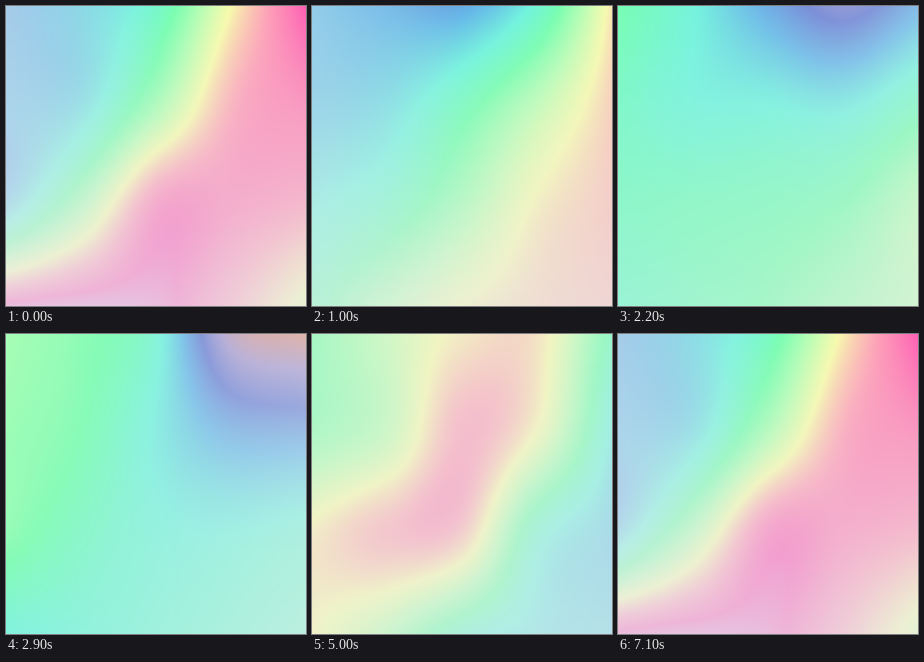
Recreate the animation shown at these times as an HTML page with a canvas. Size 300 by 300 pixels, loop 7.2 s.

```html
<!DOCTYPE html>
<html lang="en">
<head>
<meta charset="utf-8">
<title>Holographic gradient</title>
<style>
  html, body { margin: 0; width: 100%; height: 100%; overflow: hidden; }
  canvas { display: block; width: 100vw; height: 100vh; }
</style>
</head>
<body>
<canvas id="stage" width="300" height="300"></canvas>
<script>
const SIZE = 300, LOOP = 7200, STEP = 100;
const COLS = 5, ROWS = 4;

// Colour ramp: entry i belongs to tone i - 1.
const RAMP = ['#c8a4e4', '#ff50b0', '#ff9cb4', '#f8fba8', '#b4ffb0', '#70ffac',
  '#6cf4dc', '#64b8e8', '#6a80d4', '#a89cd0', '#dc9c90'].map(rgb);
const PALE = rgb('#e6e9ec');

// tone: coarse control grid; pale: top left, middle, right, bottom left, right.
const KEYS = [
  { at: 0,
    tone: [6.2, 5.6, 4.6, 2, .1,   6, 5.4, 3.3, 1.1, .6,
           5.7, 3.2, .5, .6, .9,   -.2, -.5, -.3, .9, 2.2],
    pale: [.5, .08, .05, .68, .65] },
  { at: 1000,
    tone: [5.9, 6.1, 6.2, 4.8, 1.8,   5.8, 5.4, 4.3, 2.9, 1.45,
           5.1, 4.5, 3.3, 1.9, 1.3,   4.3, 3, 2, 1.5, 1.3],
    pale: [.35, 0, .1, .62, .6] },
  { at: 1600,
    tone: [5.1, 5.8, 6.9, 6, 3.1,   5.3, 5.4, 4.8, 3.8, 2.4,
           4.9, 4.2, 3.5, 2.9, 1.75,   4.3, 3.5, 2.9, 2.2, 1.7],
    pale: [.05, 0, .2, .55, .5] },
  { at: 2900,
    tone: [3.3, 3.8, 4.8, 8.3, 9,   3.5, 4, 5.1, 6.2, 6.4,
           3.7, 4.4, 4.9, 5, 4.8,   5, 4.9, 4.8, 4.7, 4.6],
    pale: [.1, .2, .3, .18, .65] },
  { at: 3900,
    tone: [3.6, 2.6, 2.3, 4.2, 8.5,   2.8, 3, 3.9, 5.4, 7.3,
           3.1, 3.9, 4.8, 5.7, 6.3,   4.4, 4.8, 5, 5.3, 5.7],
    pale: [.2, .2, .4, .15, .55] },
  { at: 5800,
    tone: [3.9, 3.1, 1.7, .9, 1.3,   4.5, 2.8, -.3, .4, 2.9,
           1.3, -.3, -.8, 3.3, 4.8,   .4, 1.3, 4, 5.3, 5.4],
    pale: [.45, .5, .3, .68, .66] }
];

function rgb(hex) {
  return [1, 3, 5].map(i => parseInt(hex.slice(i, i + 2), 16));
}

const mix = (a, b, k) => a + (b - a) * k;

// Catmull-Rom weights of n control points for every pixel along one side.
function splineWeights(n) {
  return Array.from({ length: SIZE }, (_, px) => {
    const pos = px / (SIZE - 1) * (n - 1);
    const i = Math.min(Math.floor(pos), n - 2), f = pos - i;
    const w = new Array(n).fill(0);
    const add = (j, v) => {
      if (j < 0) { w[0] += 2 * v; w[1] -= v; }
      else if (j >= n) { w[n - 1] += 2 * v; w[n - 2] -= v; }
      else w[j] += v;
    };
    add(i - 1, (-f + 2 * f * f - f ** 3) / 2);
    add(i, (2 - 5 * f * f + 3 * f ** 3) / 2);
    add(i + 1, (f + 4 * f * f - 3 * f ** 3) / 2);
    add(i + 2, (f ** 3 - f * f) / 2);
    return w;
  });
}

const wx = splineWeights(COLS), wy = splineWeights(ROWS);
const ctx = document.getElementById('stage').getContext('2d');
const image = ctx.createImageData(SIZE, SIZE);
image.data.fill(255);

// Key with any index; its time keeps growing past the end of the loop.
function key(i) {
  const n = KEYS.length, k = KEYS[(i + n) % n];
  return { ...k, at: k.at + Math.floor(i / n) * LOOP };
}

// Monotone cubic blend of all values of one field.
function blend(name, t) {
  let i = KEYS.length - 1;
  while (KEYS[i].at > t) i--;
  const [a, b, c, d] = [i - 1, i, i + 1, i + 2].map(key);
  const h = c.at - b.at, s = (t - b.at) / h;
  const slope = (p, q, j) => (q[name][j] - p[name][j]) / (q.at - p.at);
  const tangent = (m, n) => m * n > 0 ? 2 * m * n / (m + n) : 0;
  return b[name].map((v, j) => {
    const mid = slope(b, c, j);
    const m0 = tangent(slope(a, b, j), mid) * h;
    const m1 = tangent(mid, slope(c, d, j)) * h;
    const ease = s * s * (3 - 2 * s);
    return mix(v, c[name][j], ease)
      + m0 * s * (1 - s) ** 2 - m1 * s * s * (1 - s);
  });
}

function draw(t) {
  const tone = blend('tone', t), pale = blend('pale', t);
  const [tl, tm, tr, bl, br] = pale;
  const last = RAMP.length - 1;
  let o = 0;
  for (let y = 0; y < SIZE; y++) {
    const row = [];
    for (let c = 0; c < COLS; c++) {
      row[c] = wy[y].reduce((sum, w, r) => sum + w * tone[r * COLS + c], 0);
    }
    for (let x = 0; x < SIZE; x++, o += 4) {
      const w = wx[x], u = x / SIZE;
      let v = 1;
      for (let c = 0; c < COLS; c++) v += w[c] * row[c];
      v = Math.max(0, Math.min(last, v));
      const i = Math.min(Math.floor(v), last - 1);
      const top = u < .5 ? mix(tl, tm, u * 2) : mix(tm, tr, u * 2 - 1);
      const p = mix(top, mix(bl, br, u), y / SIZE);
      for (let k = 0; k < 3; k++) {
        image.data[o + k] = mix(mix(RAMP[i][k], RAMP[i + 1][k], v - i), PALE[k], p);
      }
    }
  }
  ctx.putImageData(image, 0, 0);
}

const start = performance.now();
let shown = -1;
function tick() {
  const t = Math.max(0, performance.now() - start) % LOOP;
  const step = Math.floor(t / STEP);
  if (step !== shown) draw((shown = step) * STEP);
  requestAnimationFrame(tick);
}
tick();
</script>
</body>
</html>
```
